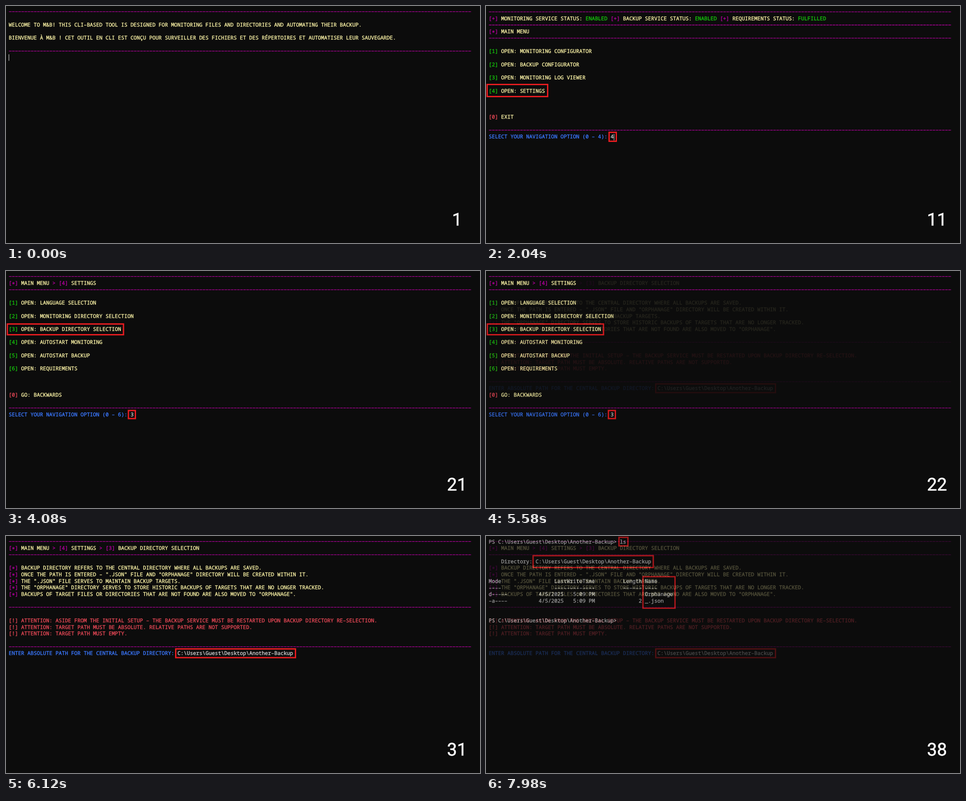
An HTML page for the animation above (8000 ms loop, 1057x530 px).

```html
<!DOCTYPE html>
<html lang="en">
<head>
<meta charset="utf-8">
<title>Backup tool walkthrough</title>
<style>
  html, body { margin: 0; width: 100%; height: 100%; overflow: hidden; background: #0c0c0c; }
  svg { display: block; width: 1057px; height: 530px; }
  text { text-rendering: geometricPrecision; }
  .screen text { font: 11.613px "Noto Sans Mono", "DejaVu Sans Mono", monospace; stroke-width: .4px; }
  .rule { stroke: #b4009e; stroke-width: 1.3; }
  .box { fill: none; stroke: #e81c20; stroke-width: 3; }
  .cursor { fill: #e6e6e6; }
  #counter { font: 39.4px Roboto, Arial, sans-serif; fill: #fff; stroke: #fff; stroke-width: .7px; text-anchor: middle; }
</style>
</head>
<body>
<svg viewBox="0 0 1057 530">
  <g id="screens"></g>
  <text id="counter" x="1005.7" y="491"></text>
</svg>
<script>
const LEFT = 6, CHAR_W = 6.968, ROW_H = 14.7, DASH_GAP = 1.1;
const COLORS = { y: '#f9f1a5', m: '#b4009e', g: '#16c60c', r: '#e74856', b: '#3b78ff', w: '#cccccc' };
const HOLD = 1500, STEP = 60, STEPS = 10, LOOP = 8000;
const SCENE = HOLD + STEP * (STEPS - 1);
const PATH = String.raw`C:\Users\Guest\Desktop\Another-Backup`;

// One line per terminal row: "=" is a rule, "~c" switches to colour c.
// Boxes are outer edges: left, top, right, bottom. Cursors are x, y.
const screens = [
  { top: 12.4, cursor: [6, 108], boxes: [], lines: `=

~yWELCOME TO M&B! THIS CLI-BASED TOOL IS DESIGNED FOR MONITORING FILES AND DIRECTORIES AND AUTOMATING THEIR BACKUP.

~yBIENVENUE À M&B ! CET OUTIL EN CLI EST CONÇU POUR SURVEILLER DES FICHIERS ET DES RÉPERTOIRES ET AUTOMATISER LEUR SAUVEGARDE.

=` },
  { top: 12.9, cursor: [285, 286], boxes: [[1, 174, 139, 204], [273, 281, 292, 304]], lines: `=
~m[+] ~yMONITORING SERVICE STATUS: ~gENABLED ~m[+] ~yBACKUP SERVICE STATUS: ~gENABLED ~m[+] ~yREQUIREMENTS STATUS: ~gFULFILLED
=
~m[*] ~yMAIN MENU
=

~g[1] ~yOPEN: MONITORING CONFIGURATOR

~g[2] ~yOPEN: BACKUP CONFIGURATOR

~g[3] ~yOPEN: MONITORING LOG VIEWER

~g[4] ~yOPEN: SETTINGS



~r[0] ~yEXIT

=
~bSELECT YOUR NAVIGATION OPTION (0 - 4): ~w4` },
  { top: 12.2, boxes: [[1.5, 117, 263.5, 144], [271.5, 310.5, 290, 331.5]], lines: `=
~m[*] ~yMAIN MENU ~m> [4] ~ySETTINGS
=

~g[1] ~yOPEN: LANGUAGE SELECTION

~g[2] ~yOPEN: MONITORING DIRECTORY SELECTION

~g[3] ~yOPEN: BACKUP DIRECTORY SELECTION

~g[4] ~yOPEN: AUTOSTART MONITORING

~g[5] ~yOPEN: AUTOSTART BACKUP

~g[6] ~yOPEN: REQUIREMENTS



~r[0] ~yGO: BACKWARDS

=
~bSELECT YOUR NAVIGATION OPTION (0 - 6): ~w3` },
  { top: 12.2, boxes: [[377, 251, 647, 273.5]], lines: `=
~m[*] ~yMAIN MENU ~m> [4] ~ySETTINGS ~m> [3] ~yBACKUP DIRECTORY SELECTION
=

~m[*] ~yBACKUP DIRECTORY REFERS TO THE CENTRAL DIRECTORY WHERE ALL BACKUPS ARE SAVED.
~m[*] ~yONCE THE PATH IS ENTERED - ".JSON" FILE AND "ORPHANAGE" DIRECTORY WILL BE CREATED WITHIN IT.
~m[*] ~yTHE ".JSON" FILE SERVES TO MAINTAIN BACKUP TARGETS.
~m[*] ~yTHE "ORPHANAGE" DIRECTORY SERVES TO STORE HISTORIC BACKUPS OF TARGETS THAT ARE NO LONGER TRACKED.
~m[*] ~yBACKUPS OF TARGET FILES OR DIRECTORIES THAT ARE NOT FOUND ARE ALSO MOVED TO "ORPHANAGE".

=

~r[!] ATTENTION: ASIDE FROM THE INITIAL SETUP - THE BACKUP SERVICE MUST BE RESTARTED UPON BACKUP DIRECTORY RE-SELECTION.
~r[!] ATTENTION: TARGET PATH MUST BE ABSOLUTE. RELATIVE PATHS ARE NOT SUPPORTED.
~r[!] ATTENTION: TARGET PATH MUST EMPTY.

=
~bENTER ABSOLUTE PATH FOR THE CENTRAL BACKUP DIRECTORY: ~w${PATH}` },
  { top: 12.4, boxes: [[295, 1.5, 318, 23.5], [103.5, 42.5, 374.5, 72], [348.5, 89.5, 423, 163]], lines: `~wPS ${PATH}> ls


~w    Directory: ${PATH}


~wMode                 LastWriteTime         Length Name
~w----                 -------------         ------ ----
~wd-----          4/5/2025   5:09 PM                Orphanage
~w-a----          4/5/2025   5:09 PM              2 _.json


~wPS ${PATH}>` },
];

// The terminal face has wide hyphens and centred asterisks.
const glyphs = s => s.replace(/-/g, '–').replace(/\*/g, '∗').replace(/&/g, '&amp;').replace(/>/g, '&gt;');

function drawLine(line, y) {
  if (line === '=') {
    return `<path class="rule" d="M${LEFT + DASH_GAP / 2} ${y + .2}H1038" stroke-dasharray="${CHAR_W - DASH_GAP} ${DASH_GAP}"/>`;
  }
  let column = 0, out = '';
  for (const run of line.split('~').slice(1)) {
    const color = COLORS[run[0]], text = run.slice(1);
    for (const words of text.matchAll(/\S+(?: \S+)*/g)) {
      const x = LEFT + (column + words.index) * CHAR_W;
      out += `<text x="${x}" y="${y + 4.2}" fill="${color}" stroke="${color}">${glyphs(words[0])}</text>`;
    }
    column += text.length;
  }
  return out;
}

function drawScreen({ top, cursor, boxes, lines }) {
  const rows = lines.split('\n').map((line, i) => drawLine(line, top + i * ROW_H));
  const frames = boxes.map(([l, t, r, b]) =>
    `<rect class="box" x="${l + 1.5}" y="${t + 1.5}" width="${r - l - 3}" height="${b - t - 3}"/>`);
  const caret = cursor ? `<rect class="cursor" x="${cursor[0]}" y="${cursor[1]}" width="1" height="14.5"/>` : '';
  return `<g class="screen"><rect width="1057" height="530" fill="#0c0c0c"/>${rows.join('')}${frames.join('')}${caret}</g>`;
}

const stage = document.getElementById('screens');
const counter = document.getElementById('counter');
stage.innerHTML = screens.map(drawScreen).join('');
const layers = [...stage.children];

function render(now) {
  const t = now % LOOP;
  const scene = Math.floor(t / SCENE);
  const fade = Math.max(0, Math.floor((t % SCENE - HOLD) / STEP) + 1);
  layers.forEach((layer, i) => {
    const opacity = i === scene ? 1 : i === scene + 1 ? fade / STEPS : 0;
    layer.style.display = opacity ? '' : 'none';
    layer.style.opacity = opacity;
  });
  counter.textContent = 1 + scene * STEPS + fade;
}

const start = performance.now();
function tick() {
  render(performance.now() - start);
  requestAnimationFrame(tick);
}
tick();
</script>
</body>
</html>
```
